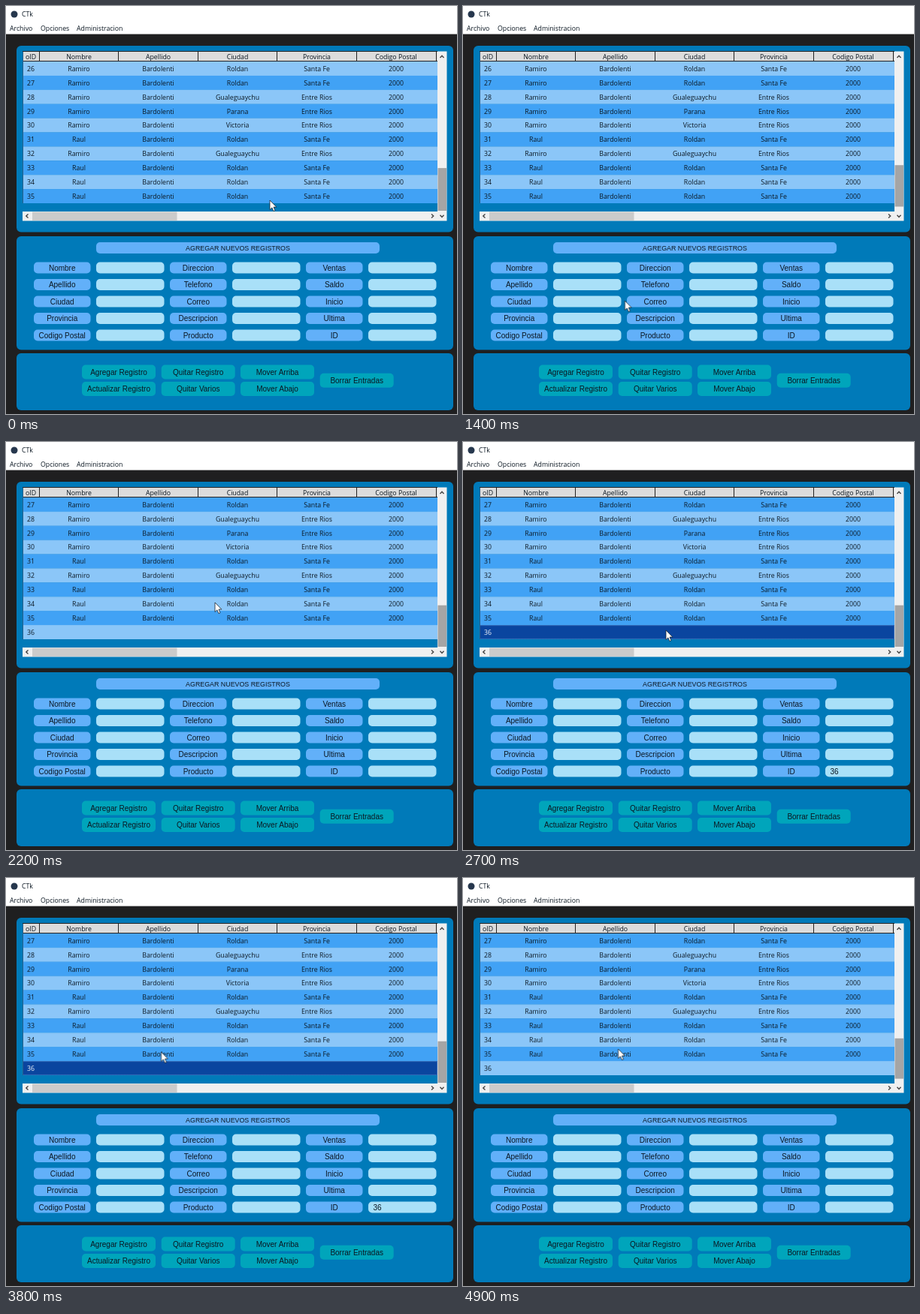
An HTML page that plays this animation: 600 by 544 pixels, repeating every 5 s.

```html
<!DOCTYPE html>
<html lang="es">
<head>
<meta charset="utf-8">
<title>CTk</title>
<style>
html, body { margin: 0; width: 100%; height: 100%; overflow: hidden; background: #1f1f20; }
svg { display: block; width: 600px; height: 544px; }
text { font: 10px "Liberation Sans", Arial, sans-serif; fill: #0b1722; text-anchor: middle; }
.ui { font: 8.75px "Open Sans", "Noto Sans", sans-serif; }
.start { text-anchor: start; }
.caps { font-size: 8.87px; }
.panel { fill: #007ab9; }
.label { fill: #62b0f9; }
.entry { fill: #a9e0f8; }
.button { fill: #00a5bb; }
.arrow { fill: none; stroke: #444; stroke-width: 1.4; }

#rows, #thumb, #hover, #hand, #arrow, .picked { animation: 5s step-end infinite; }
#rows { animation-name: scroll; }
#thumb { animation-name: thumb; }
#hover, #hand { animation-name: over; }
#arrow { animation-name: away; }
.picked { animation-name: picked; }
#cursor { animation: travel 5s infinite; }

@keyframes scroll { 0% { transform: none; } 30%, 100% { transform: translateY(-18.9px); } }
@keyframes thumb {
  0% { y: 216.1px; height: 56.9px; }
  24% { y: 212.2px; height: 55.3px; }
  30% { y: 217.7px; height: 55.3px; }
  86%, 100% { y: 213.8px; height: 53.8px; }
}
@keyframes over { 0%, 26%, 70%, 100% { opacity: 0; } 16%, 66% { opacity: 1; } }
@keyframes away { 0%, 26%, 70%, 100% { opacity: 1; } 16%, 66% { opacity: 0; } }
@keyframes picked { 0%, 86%, 100% { opacity: 0; } 52% { opacity: 1; } }
@keyframes travel {
  0% { transform: translate(351px, 259px); animation-timing-function: step-end; }
  4% { transform: translate(351px, 259px); animation-timing-function: steps(6); }
  16% { transform: translate(184px, 487px); animation-timing-function: step-end; }
  26% { transform: translate(184px, 487px); animation-timing-function: steps(3); }
  32% { transform: translate(278px, 205px); animation-timing-function: step-end; }
  36% { transform: translate(278px, 205px); animation-timing-function: steps(3); }
  42% { transform: translate(278px, 214px); animation-timing-function: step-end; }
  46% { transform: translate(278px, 214px); animation-timing-function: steps(2); }
  50% { transform: translate(270px, 251px); animation-timing-function: step-end; }
  54% { transform: translate(270px, 251px); animation-timing-function: steps(5); }
  64% { transform: translate(152px, 477px); animation-timing-function: steps(1); }
  66% { transform: translate(152px, 486px); animation-timing-function: step-end; }
  70% { transform: translate(152px, 486px); animation-timing-function: steps(3); }
  76% { transform: translate(206.5px, 232px); animation-timing-function: step-end; }
  84% { transform: translate(206.5px, 232px); animation-timing-function: steps(4); }
  92%, 100% { transform: translate(206.5px, 228px); }
}
</style>
</head>
<body>
<svg id="stage" viewBox="0 0 600 544"></svg>
<script>
const rect = (x, y, w, h, attrs = '') =>
  `<rect x="${x}" y="${y}" width="${w}" height="${h}" ${attrs}/>`;
const box = (x, y, w, h, cls, r = 5) => rect(x, y, w, h, `rx="${r}" class="${cls}"`);
const text = (x, y, str, cls = '', attrs = '') =>
  `<text x="${x}" y="${y}" class="${cls}" ${attrs}>${str}</text>`;
const line = (d, color = '#222') => `<path d="${d}" stroke="${color}" fill="none"/>`;

function windowBar() {
  return rect(0, 0, 600, 37.5, 'fill="#fff"') +
    '<circle cx="11" cy="11" r="4.5" fill="#26374d"/>' +
    text(21, 14, 'CTk', 'ui start') +
    [[5, 'Archivo'], [46, 'Opciones'], [94, 'Administracion']]
      .map(([x, s]) => text(x, 33, s, 'ui start')).join('');
}

const centers = [33, 97, 202.5, 308, 413.5, 519];
const edges = [44.5, 149.5, 255.5, 360.5, 466.5, 572.5];
const pitch = 18.9;
const riverTowns = { 28: 'Gualeguaychu', 29: 'Parana', 30: 'Victoria', 32: 'Gualeguaychu' };

function record(id) {
  if (id === 36) return [id];
  const first = id === 31 || id > 32 ? 'Raul' : 'Ramiro';
  const town = riverTowns[id];
  return [id, first, 'Bardolenti', town || 'Roldan', town ? 'Entre Rios' : 'Santa Fe', '2000'];
}

function row(id) {
  const y = 74 + (id - 26) * pitch;
  const cells = record(id).map((s, i) => text(centers[i], y + 12.8, s, 'ui')).join('');
  return rect(22, y, 552, pitch + 0.1, `fill="${id % 2 ? '#41a2f5' : '#8bc6f8'}"`) + cells;
}

function table() {
  const ids = Array.from({ length: 11 }, (_, i) => 26 + i);
  const last = 74 + 10 * pitch;
  const picked = '<g class="picked">' + rect(22, last, 552, pitch, 'fill="#0a459f"') +
    rect(22.5, last + 0.5, 551, pitch - 1, 'fill="none" stroke="#5b8fd0" stroke-dasharray="1 1"') +
    text(33, last + 12.8, 36, 'ui', 'style="fill:#fff"') + '</g>';
  const heads = ['oID', 'Nombre', 'Apellido', 'Ciudad', 'Provincia', 'Codigo Postal'];
  return '<clipPath id="view">' + rect(22, 74, 552, 189) + '</clipPath>' +
    `<g clip-path="url(#view)"><g id="rows">${ids.map(row).join('')}${picked}</g></g>` +
    rect(22, 60.5, 552, 13.5, 'fill="#dcdcdc"') +
    line('M22 60.5H574M22 73.5H574' + edges.map(x => `M${x} 61V74`).join('')) +
    line('M22.5 61V263', '#28608c') +
    heads.map((s, i) => text(centers[i], 70.8, s, 'ui')).join('');
}

function scrollbars() {
  return rect(22, 274, 552, 12.5, 'fill="#f0f0f0"') +
    rect(35, 274.5, 192.5, 11.5, 'fill="#cbcbcb"') +
    rect(574, 60.5, 12.5, 226, 'fill="#f0f0f0"') +
    rect(574.5, 216.1, 11.5, 56.9, 'id="thumb" fill="#a5a5a5"') +
    '<path class="arrow" d="M577.5 69L580 66.3 582.5 69M577.5 278.7L580 281.4 582.5 278.7' +
    'M29.5 277.5L26.8 280 29.5 282.5M566 277.5L568.7 280 566 282.5"/>';
}

function form() {
  const columns = [
    ['Nombre', 'Apellido', 'Ciudad', 'Provincia', 'Codigo Postal'],
    ['Direccion', 'Telefono', 'Correo', 'Descripcion', 'Producto'],
    ['Ventas', 'Saldo', 'Inicio', 'Ultima', 'ID']
  ];
  const fields = columns.map((names, c) => names.map((s, r) => {
    const x = 37 + c * 181, y = 341.5 + r * 22.5;
    return box(x, y, 75.5, 15, 'label') + box(x + 83, y, 90.5, 15, 'entry') +
      text(x + 37.7, y + 11.2, s);
  }).join('')).join('');
  return box(120, 315, 377, 15, 'label') +
    text(308.5, 325.7, 'AGREGAR NUEVOS REGISTROS', 'caps') + fields +
    text(488.5, 442.8, 36, 'start picked');
}

function buttons() {
  const list = [
    [101, 478.5, 'Agregar Registro'], [101, 501, 'Actualizar Registro'],
    [206.7, 478.5, 'Quitar Registro'], [206.7, 501, 'Quitar Varios'],
    [312, 478.5, 'Mover Arriba'], [312, 501, 'Mover Abajo'],
    [417.7, 489.7, 'Borrar Entradas']
  ];
  return list.map(([x, y]) => box(x, y, 98, 19, 'button')).join('') +
    rect(101, 478.5, 98, 19, 'id="hover" rx="5" fill="#1480b3"') +
    list.map(([x, y, s]) => text(x + 49, y + 13, s)).join('');
}

function cursor() {
  return '<g id="cursor" stroke="#1a2530" stroke-width=".8" stroke-linejoin="round" fill="#fff">' +
    '<path id="arrow" d="M0 0V12.5L2.9 9.9 4.9 14.6 7 13.7 5 9.1H8.8Z"/>' +
    '<path id="hand" d="M-1.3 .7Q0 -1 1.3 .7V5.5L3 5.2 4 6 5.5 5.8 6.5 6.8 8 6.8 9 8V12L7.5 17H.5' +
    'L-3.5 10.5Q-3.8 8.6 -1.3 10Z"/></g>';
}

document.getElementById('stage').innerHTML =
  rect(0, 37.5, 600, 506.5, 'fill="#1f1f20"') + windowBar() +
  box(14, 53, 581, 248.5, 'panel', 6) +
  box(14, 307, 581, 151.5, 'panel', 6) +
  box(14, 463, 581, 76, 'panel', 6) +
  table() + scrollbars() + form() + buttons() + cursor();
</script>
</body>
</html>
```
